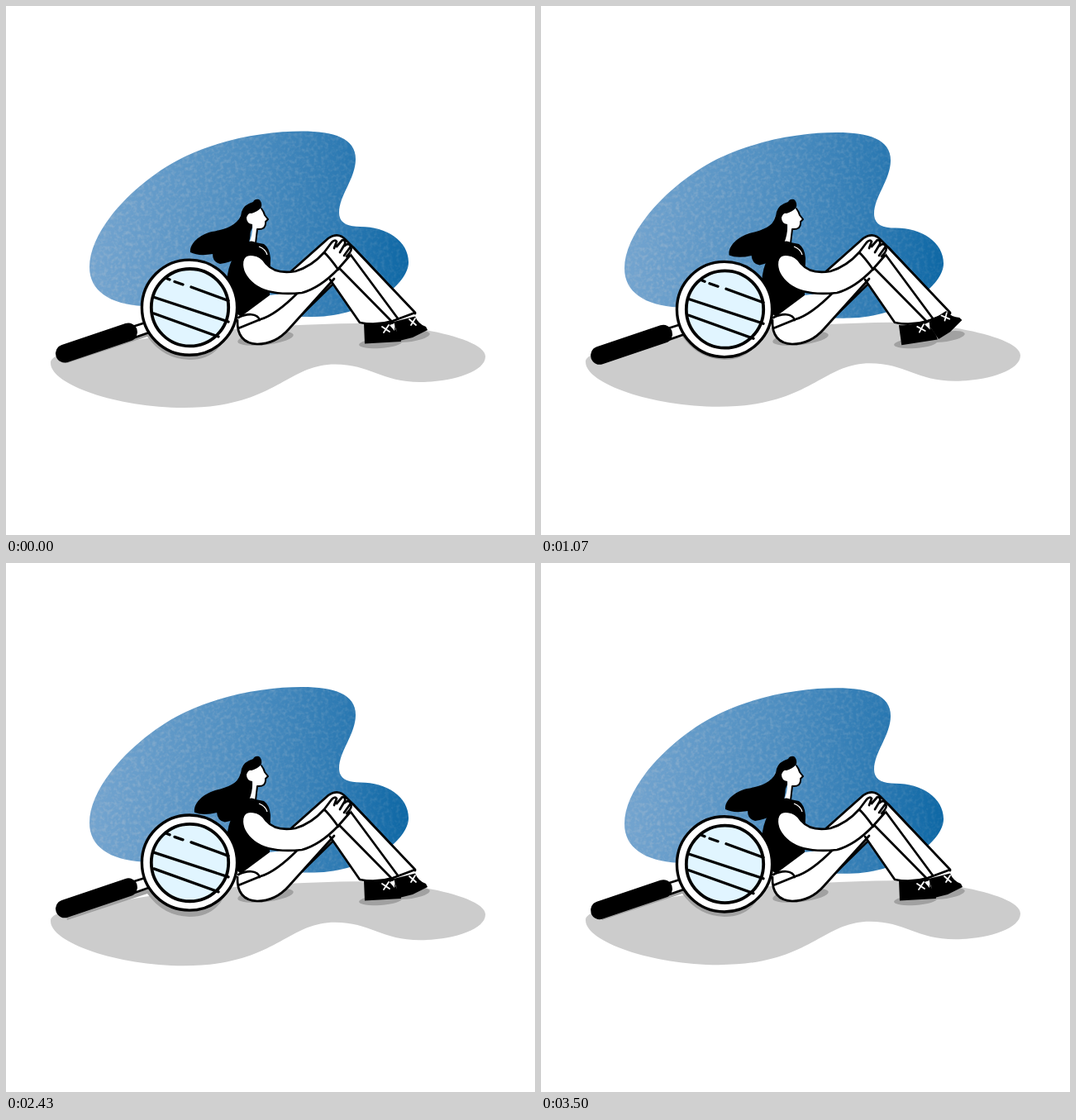
An HTML page for the animation above (3.57 s loop, 640 by 640 pixels).

```html
<!DOCTYPE html>
<html lang="en">
<head>
<meta charset="utf-8">
<title>Resting by the magnifier</title>
<style>
  html, body { margin: 0; width: 100%; height: 100%; overflow: hidden; background: #fff; }
  svg { display: block; width: 100%; height: 100%; }
  .line { fill: none; stroke: #000; stroke-width: 2.7; stroke-linecap: round; stroke-linejoin: round; }
  .skin { fill: #fff; }
  .shade { fill: #a1a1a1; }
  .lace { fill: none; stroke: #fff; stroke-width: 1.8; stroke-linecap: round; }
  #profile { stroke-width: 2; }
  #glare { stroke-width: 3.3; }
</style>
</head>
<body>
<svg viewBox="0 0 640 640">
  <defs>
    <linearGradient id="blue" gradientUnits="userSpaceOnUse" x1="105" y1="300" x2="480" y2="305">
      <stop offset="0" stop-color="#73a4cf"/>
      <stop offset=".5" stop-color="#4c8dc0"/>
      <stop offset=".8" stop-color="#2d7ab3"/>
      <stop offset="1" stop-color="#1069a6"/>
    </linearGradient>
    <filter id="grain" x="0" y="0" width="1" height="1" color-interpolation-filters="sRGB">
      <feTurbulence type="fractalNoise" baseFrequency=".22" numOctaves="2" seed="4"/>
      <feColorMatrix values="0 0 0 0 .7  0 0 0 0 .76  0 0 0 0 .82  2.4 0 0 0 -1"/>
    </filter>
    <linearGradient id="fade">
      <stop offset="0" stop-color="#fff"/>
      <stop offset="1" stop-color="#555"/>
    </linearGradient>
    <mask id="inside"><use href="#shape" fill="url(#fade)"/></mask>
    <path id="shape" d="M101 316C101 266 166 205 219 181C267 159 319 151.500 358 151.500C397 151.500 423 160 423 185C423 209 403 229 403 250C403 262 412 267 429 267C460 267 487 284 487 310C487 337 437 375 373 376C315 377 240 365 166 363C125 361 101 344 101 316Z"/>
  </defs>

  <g id="blob">
    <use href="#shape" fill="url(#blue)"/>
    <g mask="url(#inside)"><rect x="95" y="145" width="400" height="240" filter="url(#grain)" opacity=".42"/></g>
  </g>

  <path id="ground" fill="#ccc" d="M54 432C54 417 105 414 165 403C230 393 335 385 425 384C475 383 580 400 580 424C580 443 538 455 501 455C455 455 440 433.500 398 433.500C340 433.500 325 486 215 486C135 486 54 458 54 432Z"/>
  <path class="shade" d="M72 425L160 397L172 395Q190 413 231 411L264 404Q251 428 222 428Q190 427 171 400L74 432Z"/>
  <ellipse class="shade" cx="314" cy="402" rx="34" ry="8" transform="rotate(-7 314 402)"/>
  <ellipse class="shade" cx="453" cy="408" rx="26" ry="6" transform="rotate(-4 453 408)"/>
  <ellipse class="shade" cx="490" cy="400" rx="23" ry="6" transform="rotate(-9 490 400)"/>

  <!-- far leg -->
  <path class="skin" d="M345 321L390 281Q402 273 412 284L420 292L495 372L470 382L400 331L357 374L310 384Z"/>
  <path class="line" d="M345 321L390 281Q402 273 411 283L420 292L495 372M358 373L398 334"/>

  <!-- near leg -->
  <path class="skin" d="M280 377Q278 408 304 409Q326 409 342 391L393 332L428 385L469 381L495 372L420 292L400 298L345 347L318 350Z"/>
  <path class="line" d="M280 380Q279 408 304 409Q326 409 342 391L397 330M392 331L428 383Q448 387 468 381L495 371L420 292M404 318L466 381M414 297L474 378M353 347Q326 374 308 379L281 390M281 377C291 372 304 371 307 380"/>

  <g id="backShoe">
    <path d="M469 382L495 375.500Q499 385 508 388L510 392L492 401L476 405Z"/>
    <path class="lace" d="M488 379L496 386M495 378L490 386"/>
  </g>
  <g id="frontShoe">
    <path d="M433 384Q450 387 469 381L471 391Q477 399 478 406L434 408.500Z"/>
    <path class="skin" d="M464 386L470 384L470 393Z"/>
    <path class="lace" d="M455 388L464 394M463 386L457 395"/>
  </g>

  <!-- head and torso -->
  <g id="tail">
    <path d="M286 250C280 266 266 270 249 273C233 277 222 288 223 298Q233 303 250 300Q250 310 259 312Q283 309 292 291C297 281 296 267 294 257Z"/>
  </g>
  <path d="M299 237Q301 233 306 234Q310 237 309 243Q304 250 300 251L298 268Q294 282 279 287L271 270Q283 264 285 249Q288 240 299 237Z"/>
  <path class="skin" d="M297 251Q304 249 309 244L313 252L317 258L314 261Q315 271 304 270L302 288L294 287Q299 275 298 264Q291 263 291 256Q293 250 297 251Z"/>
  <path class="line" id="profile" d="M309 245Q312 249 313 253L317 258L314 261Q315 271 304 270L302 287"/>
  <path d="M288 288Q296 282 302 286L312 288Q319 293 320 305L319 350L284 376Q270 365 267 342Q266 307 288 288Z"/>
  <path d="M306 291Q314 294 316 301" fill="none" stroke="#fff" stroke-width="1.200"/>

  <!-- arm and hand -->
  <path class="skin" d="M286 309Q288 299 299 301Q309 302 315 312Q326 325 350 321Q370 315 385 298L398 284Q407 281 411 287Q420 290 418 298Q414 307 402 318Q380 341 358 347Q318 351 300 337Q284 324 286 309Z"/>
  <path class="line" d="M286 309Q288 299 299 301Q309 302 315 312Q326 325 350 321Q370 315 385 298M286 309Q284 324 300 337Q318 351 358 347Q380 341 402 318L416 302M385 298Q393 306 402 319M385 298L394 286Q398 282 400 285L397 293M400 291L407 283Q411 283 410 288L404 298M410 290Q415 286 417 291L409 302M417 292Q420 295 412 303"/>

  <g id="glass">
    <path class="line" style="fill:#fff" d="M153 388L172 382L176 394L156 401Z"/>
    <path d="M71 420.500L148 394.500" stroke="#000" stroke-width="22" stroke-linecap="round"/>
    <circle cx="222" cy="364.700" r="57.600" fill="#fff" stroke="#000" stroke-width="3.400"/>
    <circle cx="222.500" cy="364.700" r="46.700" fill="#e1f5ff" stroke="#000" stroke-width="3.800"/>
    <path class="line" id="glare" d="M193 329L198 331M204 333.500L214 337M224 340L269 356.500M178 352L269 382M179 372L257 400"/>
  </g>
</svg>
<script>
const LOOP = 3570, STEPS = 50, STEP = LOOP / STEPS;
const set = (id, value) => document.getElementById(id).setAttribute('transform', value);

// Smooth interpolation through [time, value] pairs
function along(keys, t) {
  const i = keys.findIndex(k => k[0] > t);
  if (i < 0) return keys[keys.length - 1][1];
  const [t0, v0] = keys[i - 1], [t1, v1] = keys[i];
  const u = (t - t0) / (t1 - t0);
  return v0 + (v1 - v0) * u * u * (3 - 2 * u);
}
const frontTilt = [[0, 0], [570, -3], [1070, -5.5], [1570, -7], [2290, 0]];
const backTilt = [[0, 0], [570, -16], [1070, -18], [1570, -17], [2290, 0]];

function draw(now) {
  const step = Math.floor((now + 4.5) / STEP) % STEPS;
  const t = step * STEP, phase = 2 * Math.PI * step / STEPS;
  const wave = Math.sin(phase), swing = 1 - Math.cos(phase);
  set('blob', `translate(0 ${1.7 * wave})`);
  set('ground', `translate(0 ${-1.3 * wave})`);
  set('glass', `translate(0 ${2.4 * wave})`);
  set('tail', `translate(${2 * swing} 0) rotate(${-2.5 * swing} 285 265)`);
  set('frontShoe', `rotate(${along(frontTilt, t)} 454 386)`);
  set('backShoe', `rotate(${along(backTilt, t)} 472 388)`);
  requestAnimationFrame(draw);
}
requestAnimationFrame(draw);
</script>
</body>
</html>
```
